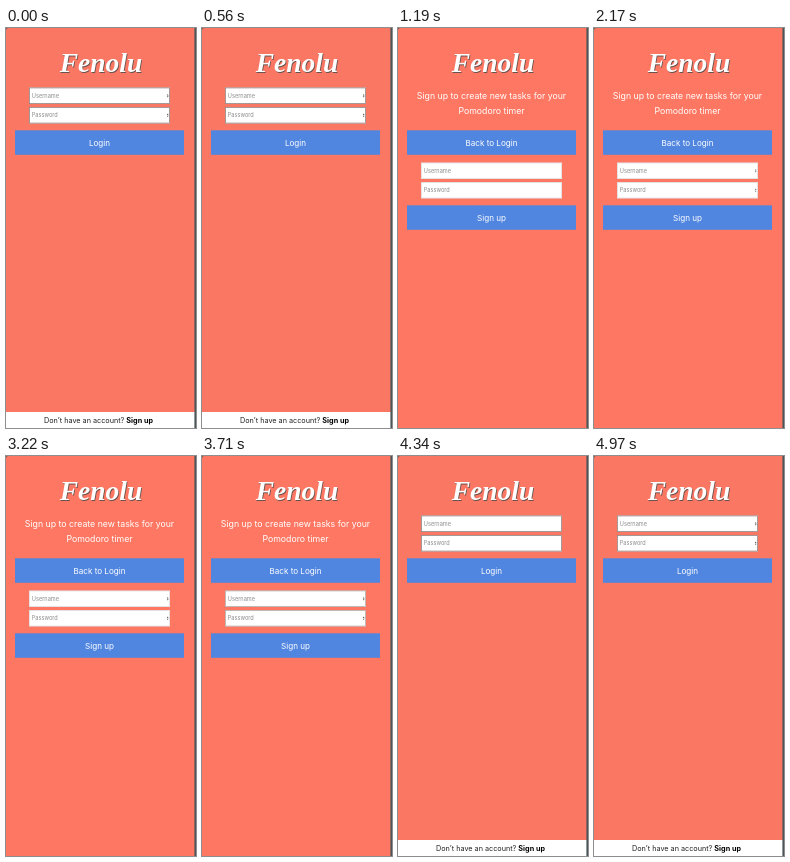
Animation of 190x400 px, one loop 5.04 s. Source, as an HTML page:

```html
<!DOCTYPE html>
<html lang="en">
<head>
<meta charset="utf-8">
<title>Timer login</title>
<style>
  html, body { margin: 0; width: 100%; height: 100%; overflow: hidden; background: #fb7763; }
  svg { display: block; width: 100vw; height: 100vh; }
  text { font-family: Inter, Roboto, sans-serif; }
  .brand { font: italic bold 27.5px "Liberation Serif", serif; fill: #fff; text-anchor: middle; }
  .shade { fill: #69534f; }
  .copy { font-size: 8.75px; fill: #fff; text-anchor: middle; }
  .label { font-size: 8.1px; fill: #fff; text-anchor: middle; }
  .hint { font-size: 5.6px; fill: #8b8b8b; }
  .foot { font-size: 7.25px; fill: #222; }
  .link { font-weight: 700; }
</style>
</head>
<body>
<svg id="stage" viewBox="0 0 190 400" preserveAspectRatio="none"></svg>
<script>
const LOOP = 5040, STEP = 70;
const stage = document.getElementById('stage');

const button = (y, label) => `
  <rect x="9" y="${y}" width="169" height="24.5" fill="#5186e0"/>
  <text class="label" x="93.5" y="${y + 15.6}">${label}</text>`;

const field = (y, hint) => `
  <rect x="23" y="${y}" width="141" height="16.5" fill="#fff"/>
  <rect class="edge" x="23.4" y="${y + 0.4}" width="140.2" height="15.7"
    fill="none" stroke="#8f807d" stroke-width=".8"/>
  <text class="hint" x="25.8" y="${y + 10.4}">${hint}</text>
  <path class="mark" d="M160.8 ${y + 7.9}l.9-1.4.9 1.4zm0 .8l.9 1.4.9-1.4z" fill="#555"/>`;

const fields = y => field(y, 'Username') + field(y + 19.5, 'Password');

stage.innerHTML = `
  <rect id="ground" width="190" height="400"/>
  <text class="brand shade" x="95.8" y="44.9">Fenolu</text>
  <text class="brand" x="95" y="44">Fenolu</text>
  <g id="login">
    ${fields(59.5)}
    ${button(102.3, 'Login')}
    <rect y="384" width="190" height="16" fill="#fff"/>
    <text class="foot" x="38" y="395">Don’t have an account?
      <tspan id="link" class="link">Sign up</tspan></text>
    <rect id="line" x="121.3" y="396" width="28.2" height=".8"/>
  </g>
  <g id="signup">
    <text class="copy" x="93.5" y="71">Sign up to create new tasks for your</text>
    <text class="copy" x="93.5" y="86">Pomodoro timer</text>
    ${button(102.3, 'Back to Login')}
    ${fields(134.5)}
    ${button(177.3, 'Sign up')}
  </g>
  <rect x="188.4" width="1.6" height="400" fill="#4d5759"/>
  <path d="M0 0H2.2Q0 0 0 2.2Z" fill="#4d5759"/>`;

const el = id => document.getElementById(id);
const login = el('login'), signup = el('signup'), ground = el('ground');
const link = el('link'), line = el('line');
const ramp = (t, from, to) => Math.min(1, Math.max(0, (t - from) / (to - from)));
const fade = (page, part, value) =>
  page.querySelectorAll(part).forEach(node => node.setAttribute('opacity', value));

function draw(time) {
  const t = Math.floor((time % LOOP) / STEP) * STEP;
  const joining = t >= 1190 && t < 4340;
  login.style.display = joining ? 'none' : '';
  signup.style.display = joining ? '' : 'none';
  ground.setAttribute('fill', joining ? '#fe7762' : '#fa7763');

  fade(login, '.mark', t < 1190 ? 1 : ramp(t, 4550, 4970));
  fade(signup, '.mark', ramp(t, 1820, 2240));
  fade(signup, '.edge', 0.3 + 0.5 * ramp(t, 3430, 3780));

  const hover = t < 1190 ? ramp(t, 910, 1120) : 0;
  const tint = `rgb(${28 * hover}, ${44 * hover}, ${104 * hover})`;
  link.setAttribute('fill', tint);
  link.style.fill = tint;
  line.setAttribute('fill', tint);
  line.setAttribute('opacity', hover > 0 ? 1 : 0);
}

const start = performance.now();
function tick() {
  draw(performance.now() - start);
  requestAnimationFrame(tick);
}
tick();
</script>
</body>
</html>
```
